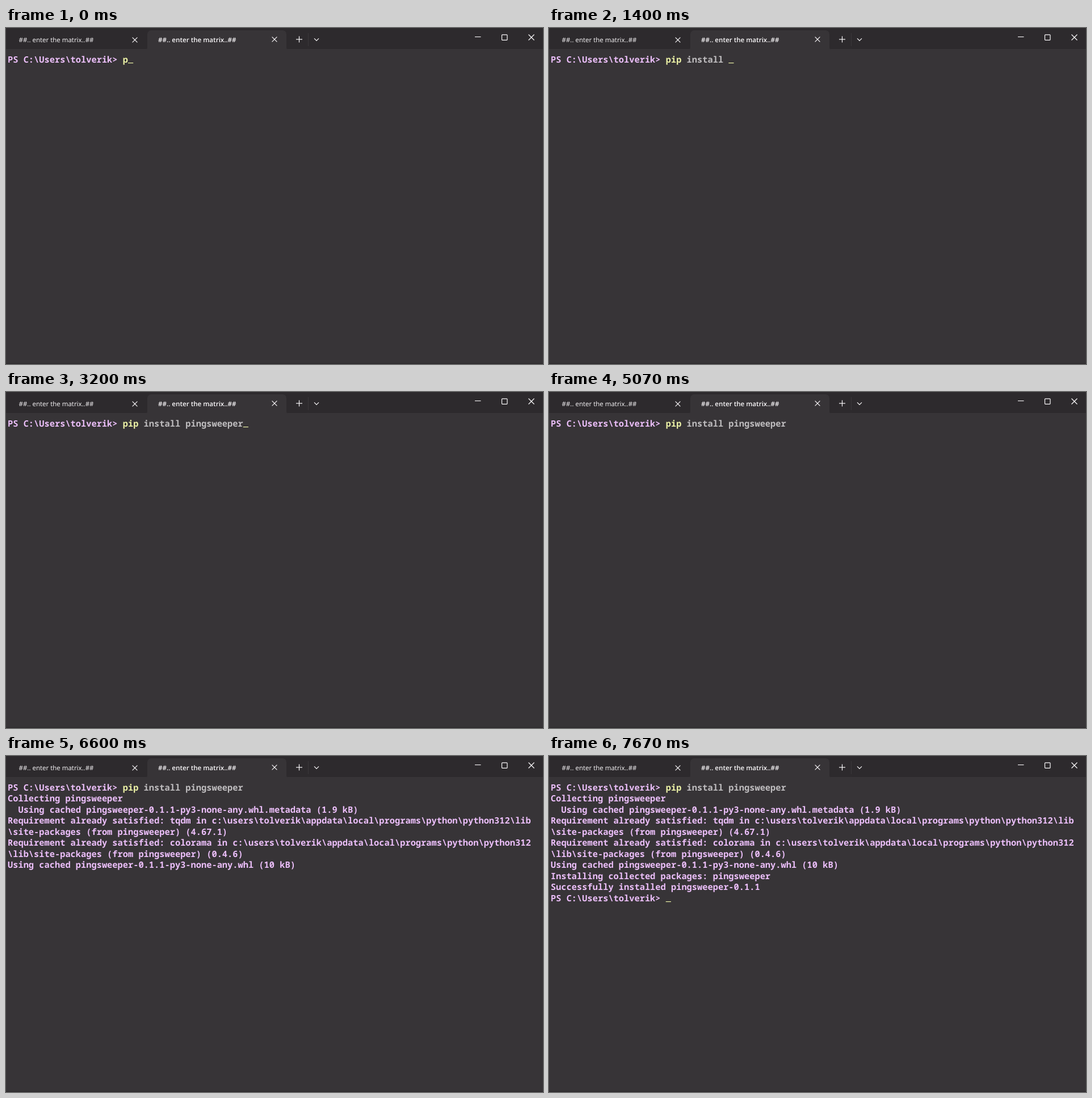
An HTML page with a canvas for the animation above (8 s loop, 946x592 px).

```html
<!DOCTYPE html>
<html lang="en">
<head>
<meta charset="utf-8">
<title>Terminal</title>
<style>
  html, body { margin: 0; width: 100%; height: 100%; overflow: hidden; background: #373437; }
  canvas { display: block; }
</style>
</head>
<body>
<canvas id="stage" width="946" height="592"></canvas>
<script>
const ctx = document.getElementById('stage').getContext('2d');
const LOOP = 8000;
const LEFT = 3, CELL = 9.216, ROW = 19.5, BASELINE = 60.5;
const PINK = '#ecbffa', YELLOW = '#ecf2a6', GREY = '#bfbdbf', WHITE = '#fbf9fb';
const BAR = '#2d2a2d', PANE = '#373437';

const USER = 'tolverik';
const PROMPT = `PS C:\\Users\\${USER}> `;
const COMMAND = 'pip install pingsweeper';
const LIB = `c:\\users\\${USER}\\appdata\\local\\programs\\python\\python312`;

// Output lines, each group printed at its own moment.
const OUTPUT = [
  [6600, [
    'Collecting pingsweeper',
    '  Using cached pingsweeper-0.1.1-py3-none-any.whl.metadata (1.9 kB)',
    `Requirement already satisfied: tqdm in ${LIB}\\lib`,
    '\\site-packages (from pingsweeper) (4.67.1)',
    `Requirement already satisfied: colorama in ${LIB}`,
    '\\lib\\site-packages (from pingsweeper) (0.4.6)',
    'Using cached pingsweeper-0.1.1-py3-none-any.whl (10 kB)'
  ]],
  [7270, ['Installing collected packages: pingsweeper']],
  [7330, ['Successfully installed pingsweeper-0.1.1']],
  [7600, [PROMPT]]
];

// Bursts of typing: [first key, last key, number of keys].
const BURSTS = [
  [0, 0, 1], [70, 70, 1], [330, 1130, 8], [1270, 1400, 2],
  [2000, 2200, 4], [2470, 2470, 1], [2670, 3200, 6]
];
const keyTimes = BURSTS.flatMap(([from, to, count]) =>
  Array.from({ length: count }, (_, i) =>
    count > 1 ? from + (to - from) * i / (count - 1) : from));

// Cursor visibility: [from, to, row, column]; without a column it follows the typing.
const CURSOR = [
  [0, 3670, 0],
  [4600, 5070, 1, 0],
  [5730, 6600, 1, 0],
  [7400, 7600, 10, 0],
  [7600, LOOP, 10, PROMPT.length]
];

function line(color, width, ...points) {
  ctx.strokeStyle = color;
  ctx.lineWidth = width;
  ctx.beginPath();
  points.forEach(([x, y]) => ctx.lineTo(x, y));
  ctx.stroke();
}

function cross(x, y, r) {
  line(WHITE, 1.2, [x - r, y - r], [x + r, y + r]);
  line(WHITE, 1.2, [x - r, y + r], [x + r, y - r]);
}

function drawTab() {
  const l = 249, r = 494, top = 4, bottom = 38, c = 7;
  ctx.fillStyle = PANE;
  ctx.beginPath();
  ctx.moveTo(l - 4, bottom);
  ctx.quadraticCurveTo(l, bottom, l, bottom - 4);
  ctx.arcTo(l, top, l + c, top, c);
  ctx.arcTo(r, top, r, top + c, c);
  ctx.lineTo(r, bottom - 4);
  ctx.quadraticCurveTo(r, bottom, r + 4, bottom);
  ctx.fill();
}

function drawTitle(x, font) {
  ctx.font = `${font} "Open Sans", "Noto Sans", sans-serif`;
  ctx.fillStyle = WHITE;
  ctx.fillText('##.. enter the matrix..##', x, 25);
}

function drawWindow() {
  ctx.fillStyle = PANE;
  ctx.fillRect(0, 0, 946, 592);
  ctx.fillStyle = BAR;
  ctx.fillRect(0, 0, 946, 37);
  ctx.fillRect(0, 590.5, 946, 1.5);
  drawTab();
  drawTitle(22.5, '500 11.5px');
  drawTitle(268, '600 11.6px');
  cross(227, 21, 4.4);
  cross(473, 20, 4.4);
  line(WHITE, 1.2, [511, 20], [522, 20]);
  line(WHITE, 1.2, [516.5, 14.5], [516.5, 25.5]);
  line('#3a373a', 1, [532.5, 9], [532.5, 32]);
  line(WHITE, 1.2, [543, 18.3], [547, 22.3], [551, 18.3]);
  line(WHITE, 1.1, [826, 15.6], [836.5, 15.6]);
  ctx.lineWidth = 1.2;
  ctx.beginPath();
  ctx.roundRect(873.5, 11.8, 9.5, 9.5, 1);
  ctx.stroke();
  cross(925.5, 16.5, 5);
}

function print(text, row, column, color) {
  ctx.font = '600 15.36px "Noto Sans Mono", "DejaVu Sans Mono", monospace';
  ctx.fillStyle = color;
  const y = BASELINE + row * ROW;
  [...text].forEach((char, i) => ctx.fillText(char, LEFT + (column + i) * CELL, y));
}

function drawCursor(row, column) {
  ctx.fillStyle = YELLOW;
  ctx.fillRect(LEFT + column * CELL, Math.floor(61 + row * ROW), CELL, 1.2);
}

function draw(t) {
  drawWindow();
  const typed = keyTimes.filter(time => time <= t).length;
  print(PROMPT, 0, 0, PINK);
  print(COMMAND.slice(0, Math.min(typed, 3)), 0, PROMPT.length, YELLOW);
  print(COMMAND.slice(3, Math.max(typed, 3)), 0, PROMPT.length + 3, GREY);

  OUTPUT.filter(([time]) => time <= t)
    .flatMap(([, lines]) => lines)
    .forEach((text, i) => print(text, i + 1, 0, PINK));

  const cursor = CURSOR.find(([from, to]) => t >= from && t < to);
  if (cursor) drawCursor(cursor[2], cursor[3] ?? PROMPT.length + typed);
}

ctx.textRendering = 'geometricPrecision';
const start = performance.now();
function tick() {
  draw((performance.now() - start) % LOOP);
  requestAnimationFrame(tick);
}
tick();
</script>
</body>
</html>
```
